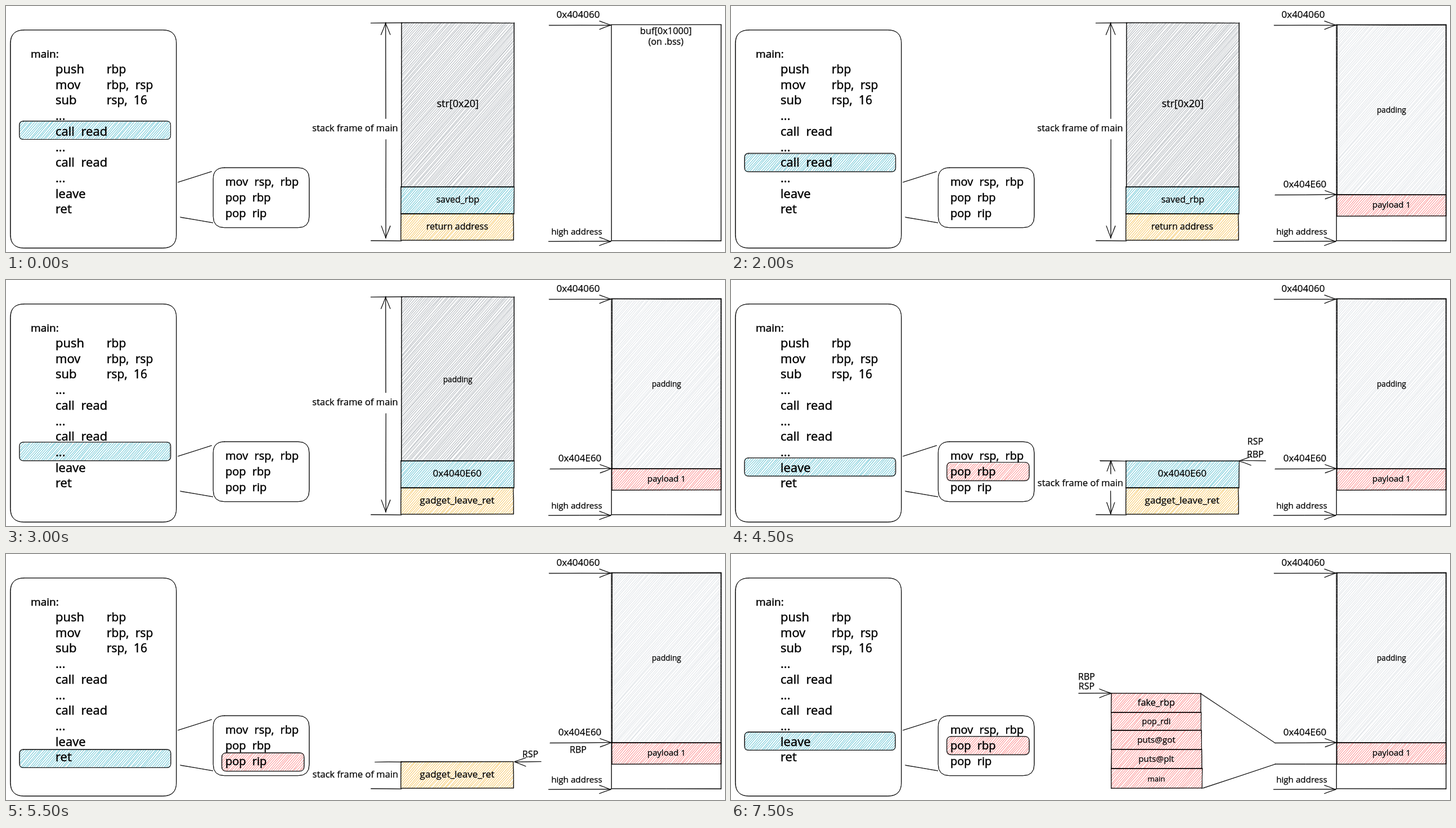
These frames come from a looping animation (1278 px wide and 438 px high, 8 s). An HTML page:

```html
<!DOCTYPE html>
<html lang="en">
<head>
<meta charset="utf-8">
<title>Stack pivot</title>
<style>
html, body { margin: 0; width: 100%; height: 100%; overflow: hidden; background: #fff; }
svg { display: block; width: 100%; height: 100%; }
path { fill: none; stroke: #000; stroke-width: .85; stroke-linecap: round; stroke-linejoin: round; }
text { font-family: "Open Sans", sans-serif; fill: #000; stroke: #000; stroke-width: .25; white-space: pre; }
.code { word-spacing: 6px; stroke-width: .5; }
.label { text-anchor: middle; }
</style>
</head>
<body>
<svg id="stage" viewBox="0 0 1278 438"></svg>
<script>
const LOOP = 8000;
const TEAL = '#17a5bd', RED = '#fa5252', AMBER = '#f2aa14', GRAY = '#868e96', PALE = '#ced4da';
const stage = document.getElementById('stage');
const sheet = document.head.appendChild(document.createElement('style')).sheet;
let layer = stage;
let seed = 7;

function random() {
  seed = (seed * 16807) % 2147483647;
  return seed / 2147483647;
}
const jitter = amount => (random() * 2 - 1) * amount;
const fix = n => n.toFixed(1);

function add(tag, attrs, content) {
  const node = document.createElementNS('http://www.w3.org/2000/svg', tag);
  for (const key in attrs) node.setAttribute(key, attrs[key]);
  if (content) node.textContent = content;
  return layer.appendChild(node);
}

// Shows what draw() adds only from start to end (ms) in each loop.
function during(start, end, draw) {
  const name = `on${start}to${end}`;
  const percent = ms => ms / LOOP * 100 + '%';
  sheet.insertRule(`@keyframes ${name} { 0% { opacity: 0 } ${percent(start)} { opacity: 1 } ${percent(end)} { opacity: 0 } }`);
  layer = add('g', { style: `animation: ${name} ${LOOP}ms step-end infinite` });
  draw();
  layer = stage;
}

// A straight line sketched twice with a slight bow.
function sketch(x1, y1, x2, y2, wobble = .6) {
  let d = '';
  for (let pass = 0; pass < 2; pass++) {
    const j = () => jitter(wobble);
    d += `M${fix(x1 + j())} ${fix(y1 + j())}Q${fix((x1 + x2) / 2 + j())} ${fix((y1 + y2) / 2 + j())} ${fix(x2 + j())} ${fix(y2 + j())}`;
  }
  return d;
}
const line = (...ends) => add('path', { d: sketch(...ends) });

function arrow(x1, y1, x2, y2, length = 20, spread = 7.5) {
  const size = Math.hypot(x2 - x1, y2 - y1);
  const ux = (x2 - x1) / size, uy = (y2 - y1) / size;
  const barb = side => sketch(x2, y2, x2 - ux * length - uy * spread * side, y2 - uy * length + ux * spread * side);
  add('path', { d: sketch(x1, y1, x2, y2) + barb(1) + barb(-1) });
}

function hatch(x1, y1, x2, y2, color) {
  const angle = 49 * Math.PI / 180, sin = Math.sin(angle), cos = Math.cos(angle);
  const wobble = y2 - y1 > 100 ? 1.4 : 1;
  let d = '';
  for (let c = x1 * sin + y1 * cos + 2; c < x2 * sin + y2 * cos; c += 3.1) {
    const left = Math.max(x1, (c - y2 * cos) / sin);
    const right = Math.min(x2, (c - y1 * cos) / sin);
    d += sketch(left, (c - left * sin) / cos, right, (c - right * sin) / cos, wobble);
  }
  add('path', { d, style: `stroke: ${color}; stroke-width: .5` });
}

function box(x1, y1, x2, y2, color) {
  if (color) hatch(x1, y1, x2, y2, color);
  line(x1, y1, x2, y1);
  line(x2, y1, x2, y2);
  line(x2, y2, x1, y2);
  line(x1, y2, x1, y1);
}

function roundBox(x1, y1, x2, y2, r, color) {
  if (color) hatch(x1 + 1, y1 + 1, x2 - 1, y2 - 1, color);
  let d = '';
  for (let pass = 0; pass < 2; pass++) {
    const [l, t, e, b] = [x1, y1, x2, y2].map(n => n + jitter(.5));
    d += `M${l + r} ${t}L${e - r} ${t}Q${e} ${t} ${e} ${t + r}L${e} ${b - r}Q${e} ${b} ${e - r} ${b}L${l + r} ${b}Q${l} ${b} ${l} ${b - r}L${l} ${t + r}Q${l} ${t} ${l + r} ${t}`;
  }
  add('path', { d });
}

const code = (x, y, content, size = 22) =>
  add('text', { x, y, class: 'code', 'font-size': size }, content);
const label = (x, y, content, size = 16) =>
  add('text', { x, y: y + 5, class: 'label', 'font-size': size }, content);

// Code panel and the expanded instructions
roundBox(8, 42.5, 303, 431, 24);
roundBox(368, 288, 539, 394.5, 20);
line(306, 314, 365, 294.5);
line(310, 376, 367, 386);

[[0, 1000, 205], [1000, 2000, 233], [2000, 3000, 262.5], [3000, 3500, 289],
 [3500, 5500, 317], [5500, 6500, 348], [6500, 8000, 317]].forEach(([start, end, y]) =>
  during(start, end, () => roundBox(24, y, 292.5, y + 32.5, 7, TEAL)));
[[3500, 4500, 296.5], [4500, 5500, 325], [5500, 6500, 354], [6500, 7500, 296.5],
 [7500, 8000, 325]].forEach(([start, end, y]) =>
  during(start, end, () => roundBox(383.5, y, 530, y + 32.5, 8, RED)));

code(44, 92, 'main:', 19);
[['push', 'rbp'], ['mov', 'rbp, rsp'], ['sub', 'rsp, 16'], ['...'], ['call read'], ['...'],
 ['call read'], ['...'], ['leave'], ['ret']].forEach(([op, args], i) => {
  const y = 120 + i * 27.7;
  code(88, y, op);
  if (args) code(179, y, args, 21);
});
['mov rsp, rbp', 'pop rbp', 'pop rip'].forEach((op, i) => code(390, 320 + i * 28, op, 20));

// Stack frame
during(0, 4500, () => {
  box(703, 30, 903, 322, GRAY);
  line(648, 30, 703, 30);
  arrow(675, 200, 675, 30, 21, 8);
  arrow(675, 238, 675, 413, 21, 8);
  label(620.5, 218, 'stack frame of main', 16.5);
});
during(0, 5500, () => box(702, 322, 903, 370, TEAL));
during(0, 6500, () => {
  box(702, 370, 902, 417, AMBER);
  line(649, 418, 703, 418);
});
during(0, 3000, () => {
  label(803, 175, 'str[0x20]', 18);
  label(803, 345, 'saved_rbp');
  label(802, 393, 'return address');
});
during(3000, 4500, () => label(803, 177, 'padding', 13.7));
during(3000, 5500, () => label(802, 345, '0x4040E60', 17));
during(3000, 6500, () => label(802, 393, 'gadget_leave_ret', 17));
during(4500, 5500, () => {
  line(656, 322, 703, 322);
  arrow(675, 345, 675, 322, 18, 7);
  arrow(675, 376, 675, 416, 20, 7);
  label(621, 362, 'stack frame of main', 16.5);
});
during(5500, 6500, () => {
  line(656, 370, 703, 370);
  label(621, 393, 'stack frame of main', 16.5);
});

// Registers
during(3500, 4500, () => {
  label(932, 21, 'RSP');
  arrow(953, 32, 904, 32);
  label(932, 311, 'RBP');
  arrow(953, 322, 904, 322);
});
during(4500, 5500, () => {
  label(932, 288, 'RSP');
  label(932, 311, 'RBP');
  arrow(950, 322, 904, 322);
});
during(5500, 6500, () => {
  label(932, 357, 'RSP');
  arrow(951, 370, 904, 370);
});
during(6500, 7500, () => {
  label(932, 405, 'RSP');
  arrow(951, 418, 904, 418);
});
during(5500, 7500, () => label(1017, 349, 'RBP'));

// Buffer
box(1076, 33.5, 1271, 418);
label(1017, 16, '0x404060', 17);
arrow(965, 34.5, 1075, 34);
label(1014.5, 402, 'high address', 15.2);
arrow(964, 419, 1075, 419);
during(0, 1000, () => {
  label(1173, 45, 'buf[0x1000]', 16.4);
  label(1173, 64, '(on .bss)');
});
during(1000, 8000, () => {
  box(1077, 34, 1271, 336, PALE);
  box(1077, 336, 1271, 374, RED);
  label(1174, 185, 'padding', 13.7);
  label(1174, 354, 'payload 1', 15);
  label(1020, 318, '0x404E60', 17);
  arrow(967, 336.5, 1076, 336);
});

// Payload as the new stack
during(7500, 8000, () => {
  label(632, 219, 'RBP');
  label(632, 236, 'RSP');
  arrow(618, 248, 675, 248);
  [['fake_rbp', 248, 282, 16.4], ['pop_rdi', 282, 314, 14.4], ['puts@got', 314, 348, 15.2],
   ['puts@plt', 348, 382, 15.2], ['main', 382, 417, 13.2]].forEach(([name, top, bottom, size], i) => {
    box(676, top, 835 + i * .6, bottom, RED);
    label(756, (top + bottom) / 2, name, size);
  });
  line(836, 249, 967, 336);
  line(839, 417, 967, 374);
  line(967, 374, 1076, 374);
});
</script>
</body>
</html>
```
